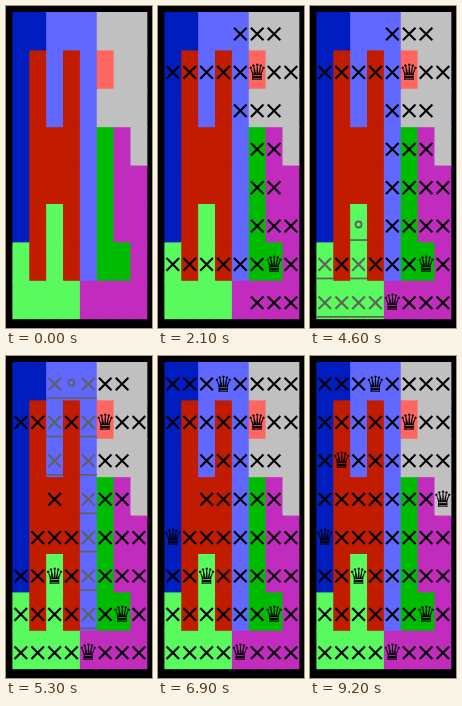
These frames come from a looping animation (146x322 px, 9300 ms). An HTML page with a canvas:

```html
<!DOCTYPE html>
<html lang="en">
<head>
<meta charset="utf-8">
<title>Queens solver</title>
<style>
  html, body { margin: 0; width: 100%; height: 100%; overflow: hidden; background: #000; }
  canvas { display: block; width: 146px; height: 322px; }
</style>
</head>
<body>
<canvas id="board" width="146" height="322"></canvas>
<script>
const LOOP = 9300, TICK = 100, SIZE = 8;
const LEFT = 6.4, TOP = 6, CELL_W = 16.87, CELL_H = 38.4;
const RIGHT = LEFT + SIZE * CELL_W, BOTTOM = TOP + SIZE * CELL_H;
const DIM = '#606060';

const regions = [
  'BBPPPGGG',
  'BRPRPCGG',
  'BRPRPGGG',
  'BRRRPNMG',
  'BRRRPNMM',
  'BRLRPNMM',
  'LRLRPNNM',
  'LLLLMMMM'
];
const colors = {
  B: '#001ebf', P: '#6068ff', G: '#c0c0c0', R: '#c11b00',
  C: '#ff6660', N: '#00bc00', M: '#c22cbe', L: '#58fa5e'
};

// Each step looks at one region or row, then settles a cell.
const steps = [
  { look: 100, act: 700, region: 'C', r: 1, c: 5 },
  { look: 1100, act: 1600, region: 'N', r: 6, c: 6 },
  { look: 2700, act: 3300, region: 'G', r: 4, c: 7, cross: true },
  { look: 3400, act: 4000, region: 'M', r: 7, c: 4 },
  { look: 4400, act: 4900, region: 'L', r: 5, c: 2 },
  { look: 5300, act: 5600, region: 'P', r: 0, c: 3 },
  { look: 6300, act: 6800, row: 4, r: 4, c: 0 },
  { look: 7200, act: 7500, region: 'R', r: 2, c: 1 },
  { look: 8300, act: 8800, region: 'G', r: 3, c: 7 }
];

const ctx = document.getElementById('board').getContext('2d');
ctx.font = '22.5px "DejaVu Sans", sans-serif';
ctx.textAlign = 'center';

function eachCell(visit) {
  for (let r = 0; r < SIZE; r++)
    for (let c = 0; c < SIZE; c++) visit(r, c, LEFT + c * CELL_W, TOP + r * CELL_H);
}

// A queen crosses out its row, then its column, then its neighbours and region.
function crossed(step, r, c, age) {
  if (r === step.r) return age >= TICK;
  if (c === step.c) return age >= 2 * TICK;
  const near = Math.abs(r - step.r) === 1 && Math.abs(c - step.c) === 1;
  return age >= 3 * TICK && (near || regions[r][c] === step.region);
}

function markAt(r, c, time) {
  let mark = '';
  for (const step of steps) {
    const age = time - step.act;
    if (age < 0) break;
    if (step.r === r && step.c === c) mark = step.cross ? 'x' : 'q';
    else if (!mark && !step.cross && crossed(step, r, c, age)) mark = 'x';
  }
  return mark;
}

function drawMark(mark, x, y, color) {
  const h = 6.3;
  ctx.strokeStyle = ctx.fillStyle = color;
  ctx.beginPath();
  if (mark === 'q') {
    ctx.fillText('♛', x, y + 7.5);
  } else if (mark === 'x') {
    ctx.lineWidth = 2.1;
    ctx.moveTo(x - h, y - h);
    ctx.lineTo(x + h, y + h);
    ctx.moveTo(x + h, y - h);
    ctx.lineTo(x - h, y + h);
    ctx.stroke();
  } else {
    ctx.lineWidth = 1.8;
    ctx.arc(x, y - 1.5, 3, 0, Math.PI * 2);
    ctx.stroke();
  }
}

function draw(time) {
  const active = steps.find(s => time >= s.look && time < s.act);
  ctx.fillStyle = '#000';
  ctx.fillRect(0, 0, 146, 322);
  // Cells overlap by a pixel so that no dark seams show between them.
  eachCell((r, c, x, y) => {
    ctx.fillStyle = colors[regions[r][c]];
    ctx.fillRect(x, y, Math.min(CELL_W + 1, RIGHT - x), Math.min(CELL_H + 1, BOTTOM - y));
  });
  eachCell((r, c, x, y) => {
    const lit = active && (active.region === regions[r][c] || active.row === r);
    const mark = markAt(r, c, time);
    if (lit) {
      ctx.fillStyle = DIM;
      ctx.fillRect(x, y + 35.2, CELL_W, 1.7);
    }
    if (mark || lit) drawMark(mark, x + CELL_W / 2, y + 22, lit ? DIM : '#000');
  });
}

const start = performance.now();
function frame() {
  const time = (performance.now() - start) % LOOP;
  draw(Math.floor(time / TICK) * TICK);
  requestAnimationFrame(frame);
}
frame();
</script>
</body>
</html>
```
